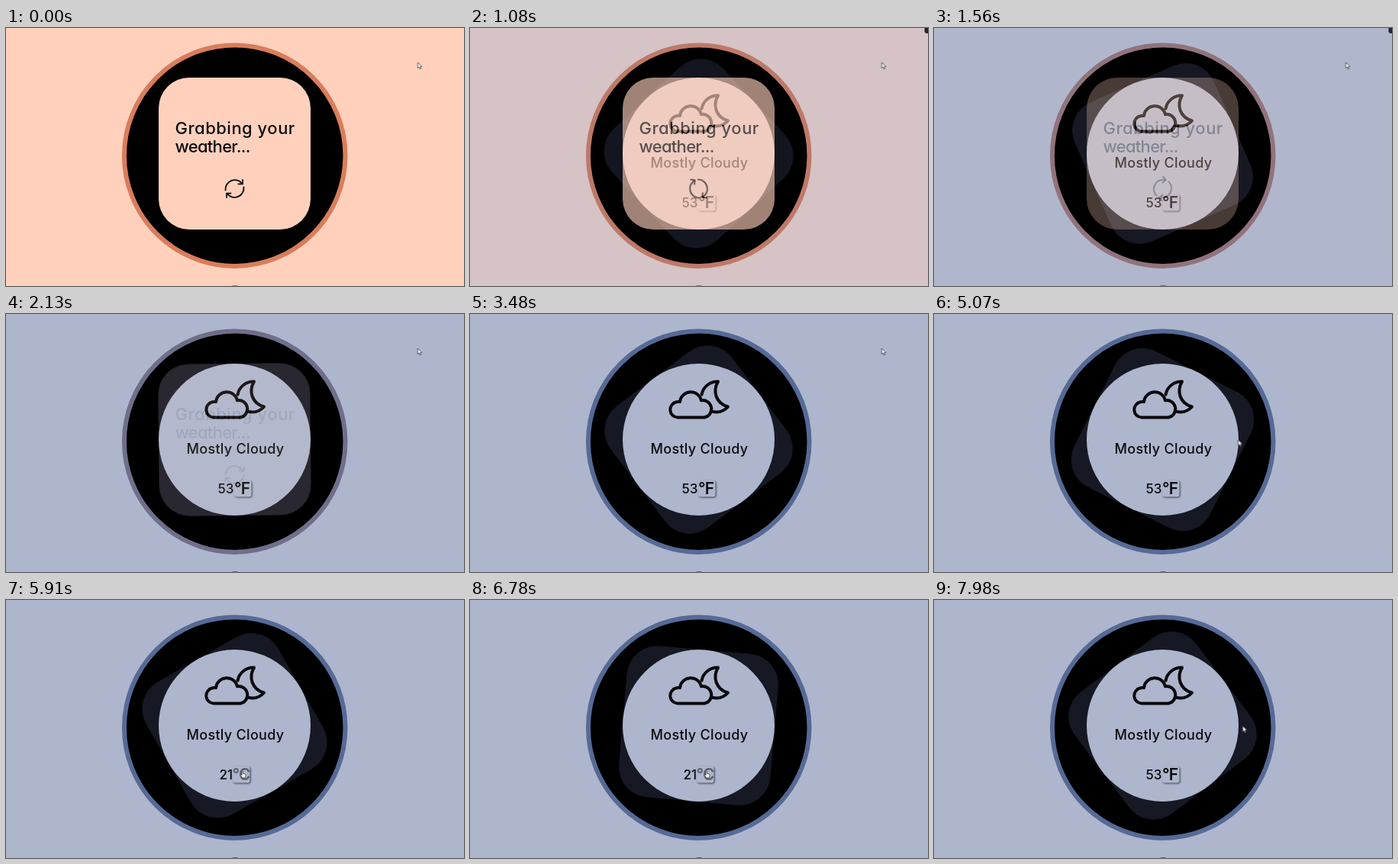
Animation, 600 px wide and 338 px high, one loop 8000 ms. Source, as an HTML page:

```html
<!DOCTYPE html>
<html lang="en">
<head>
<meta charset="utf-8">
<title>Weather dial</title>
<style>
  html, body { margin: 0; width: 100%; height: 100%; overflow: hidden; background: #ffd1bc; }
  svg { display: block; width: 100vw; height: 100vh; }
  svg * { animation-duration: 8s; animation-iteration-count: infinite; }
  text { font-family: Inter, Lato, sans-serif; font-feature-settings: "cv11"; font-weight: 500; fill: #0b0b0d; }

  .sky { animation-name: sky; }
  @keyframes sky {
    0%, 9.75% { fill: #ffd1bc; }
    22.25%, 100% { fill: #aeb6cd; }
  }
  .ring { animation-name: ring; }
  @keyframes ring {
    0%, 7.5% { stroke: #d97d5b; }
    45%, 100% { stroke: #566a96; }
  }
  .tile {
    transform-origin: 299.5px 164.5px;
    animation-name: turn, tint;
    animation-timing-function: linear, ease;
  }
  @keyframes turn {
    from { transform: rotate(3.8deg); }
    to { transform: rotate(323.8deg); }
  }
  @keyframes tint {
    0%, 6% { fill: #000; }
    19%, 100% { fill: #161923; }
  }
  .loading { animation-name: fade; }
  @keyframes fade {
    0%, 6.25% { opacity: 1; }
    37.5%, 100% { opacity: 0; }
  }
  .sync { transform-origin: 299.5px 210.5px; animation-name: spin; animation-timing-function: linear; }
  @keyframes spin { to { transform: rotate(720deg); } }

  .line { fill: none; stroke: #08080a; stroke-linecap: round; stroke-linejoin: round; }
  .key { filter: drop-shadow(1px 1px 1px rgba(0, 0, 0, .65)); }
  .unit { font-size: 21px; font-weight: 600; letter-spacing: -.8px; animation-name: hover; }
  @keyframes hover {
    0%, 67.1%, 95%, 100% { opacity: 1; }
    70%, 91.6% { opacity: .5; }
  }

  .fahrenheit, .celsius, .arrow, .hand { animation-timing-function: step-end; }
  .fahrenheit { animation-name: fahrenheit; }
  .celsius { animation-name: celsius; }
  .arrow { animation-name: arrow; }
  .hand { animation-name: hand; }
  @keyframes fahrenheit { 0%, 88.125% { opacity: 1; } 72.5% { opacity: 0; } 100% { opacity: 1; } }
  @keyframes celsius { 0%, 88.125% { opacity: 0; } 72.5% { opacity: 1; } 100% { opacity: 0; } }
  @keyframes arrow { 0%, 91.625% { opacity: 1; } 67.125% { opacity: 0; } 100% { opacity: 1; } }
  @keyframes hand { 0%, 91.625% { opacity: 0; } 67.125% { opacity: 1; } 100% { opacity: 0; } }

  .pointer { animation-name: move; }
  @keyframes move {
    0%, 61% { transform: translate(539.5px, 45px); animation-timing-function: ease-in; }
    63.375% { transform: translate(399px, 164.5px); animation-timing-function: ease-out; }
    67.5%, 91.25% { transform: translate(309px, 224px); }
    96.25%, 100% { transform: translate(404.5px, 165px); }
  }
  .corner { animation-name: corner; animation-timing-function: step-end; }
  @keyframes corner { 0%, 24% { opacity: 0; } 7.5% { opacity: 1; } 100% { opacity: 0; } }
</style>
</head>
<body>
<svg viewBox="0 0 600 338" preserveAspectRatio="none">
  <rect class="sky" width="600" height="338"/>
  <ellipse cx="300" cy="339.5" rx="6" ry="2.5" fill="#000" opacity=".45"/>
  <rect class="corner" x="595.5" y="-8" width="20" height="15" rx="3" fill="#20242e"/>

  <circle class="ring" cx="299.7" cy="167.2" r="144.8" stroke-width="6"/>
  <rect class="tile" x="200" y="65" width="199" height="199" rx="40"/>
  <circle class="sky" cx="299.5" cy="164.5" r="99.5"/>

  <g class="line" stroke-width="4">
    <path d="M272 135.5 A10.2 10.2 0 0 1 270.5 115.3 Q273 114.5 275 115 A14.2 14.2 0 0 1 303 113.3 A11.2 11.2 0 0 1 307 135.5 Z"/>
    <path d="M303.5 105.5 A21 21 0 0 1 325 88.5 C317.5 101 322 117 338 121.5 A21 21 0 0 1 318.5 128"/>
  </g>

  <text x="236.5" y="183" font-size="18" letter-spacing=".3">Mostly Cloudy</text>

  <g class="fahrenheit">
    <rect class="key sky" x="299" y="218" width="22.5" height="21.5" rx="3"/>
    <text x="277.5" y="234.5" font-size="17">53</text>
    <text class="unit" x="299" y="236">°F</text>
  </g>
  <g class="celsius">
    <rect class="key sky" x="297" y="218" width="22.5" height="21.5" rx="3"/>
    <text x="279.5" y="234.5" font-size="17">21</text>
    <text class="unit" x="296.5" y="236">°C</text>
  </g>

  <g class="loading">
    <rect x="200" y="65" width="199" height="199" rx="40" fill="#ffd1bc"/>
    <text x="221.5" y="139" font-size="22" letter-spacing=".5">Grabbing your</text>
    <text x="221.5" y="162.5" font-size="22" letter-spacing="-.7">weather...</text>
    <g class="sync line" stroke-width="1.8">
      <path id="half" d="M287.5 212.5 A12.2 12.2 0 0 1 309 203.5 M310 198.8 V204.4 H304.4"/>
      <use href="#half" transform="rotate(180 299.5 210.5)"/>
    </g>
  </g>

  <g class="pointer" stroke="#333a46" stroke-width=".8" stroke-linejoin="round" fill="#fff">
    <path class="arrow" d="M0 0 V7.6 L1.7 6.1 L2.9 8.8 L4.2 8.2 L3 5.6 H5.2 Z"/>
    <path class="hand" d="M0 .5 Q.8 -.6 1.5 .5 V3.4 L4.6 4.2 Q5.3 4.6 5.1 5.6 L4.4 9 H.6 L-2 5.6 Q-1.6 4.6 -.6 5.2 L0 5.7 Z"/>
  </g>
</svg>
</body>
</html>
```
